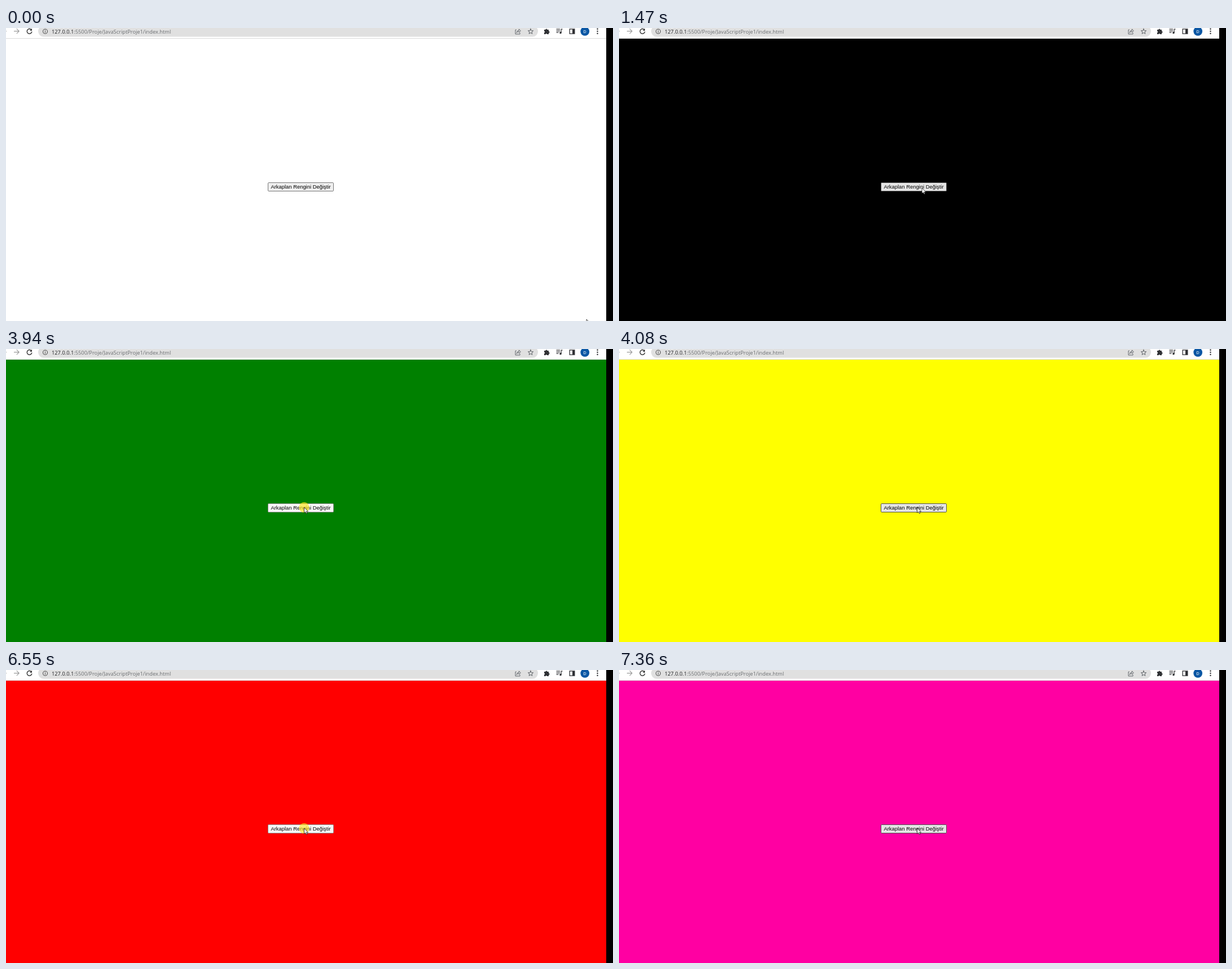
An HTML page for the animation above (8000 ms loop, 1076 by 520 pixels).

```html
<!DOCTYPE html>
<html lang="tr">
<head>
<meta charset="utf-8">
<title>Arkaplan Rengi</title>
<style>
  html, body { margin: 0; width: 100%; height: 100%; overflow: hidden; background: #000; }
  svg { display: block; width: 1076px; height: 520px; }
  .line { fill: none; stroke-linecap: round; stroke-linejoin: round; }
</style>
</head>
<body>
<svg viewBox="0 0 1076 520" xmlns="http://www.w3.org/2000/svg">
  <rect width="1076" height="520" fill="#000"/>
  <rect id="page" y="19" width="1064" height="501"/>

  <!-- toolbar -->
  <rect width="1064" height="19" fill="#fff"/>
  <rect y="18" width="1064" height="1" fill="#dadada"/>
  <rect x="57" y="-4" width="886" height="19.5" rx="9.75" fill="#e0e0e0"/>
  <path class="line" d="M-1 5.7H.4" stroke="#777"/>
  <path class="line" d="M14.5 5.7H23M19.2 1.7L23.2 5.7L19.2 9.7" stroke="#999" stroke-width="1.2"/>
  <path class="line" d="M45 3.2A4.3 4.3 0 1 0 45.7 7" stroke="#333" stroke-width="1.4"/>
  <path d="M46 .8V4.8H42Z" fill="#333"/>
  <circle cx="69.5" cy="6" r="4" fill="none" stroke="#555" stroke-width="1.1"/>
  <path d="M69.5 5.5V8.3M69.5 3.6V4.7" stroke="#555" stroke-width="1.1"/>
  <text x="81" y="9.5" font-family="'Open Sans', 'Noto Sans', sans-serif" font-size="9.29" fill="#202124">127.0.0.1<tspan fill="#6a6d70">:5500/Proje/JavaScriptProje1/index.html</tspan></text>
  <g class="line" stroke="#5f6368" stroke-width="1">
    <path d="M904.5 3.2H903V10.8H911V8.8M905.3 8C905.8 5.2 907.5 4.2 909.3 4.1V2L912.4 5L909.3 8V6C907.8 6 906.5 6.6 905.3 8Z"/>
    <path id="star"/>
  </g>
  <g fill="#303134">
    <path d="M954 3H956.3A1.6 1.6 0 1 1 959.5 3H962V5.6A1.6 1.6 0 1 1 962 8.8V11H959.3A1.5 1.5 0 0 0 956.4 11H954V8.3A1.5 1.5 0 0 0 954 5.4Z"/>
    <path d="M975.5 1.5H982V2.8H975.5ZM975.5 4.4H982V5.7H975.5ZM975.5 7.3H979.5V8.6H975.5ZM983.5 1.5H986.5V2.8H984.7V8.3H983.5Z"/>
    <circle cx="983" cy="8.4" r="1.8"/>
    <path d="M998.5 1.2H1008.5V10.8H998.5ZM999.8 2.5V9.5H1004V2.5Z" fill-rule="evenodd"/>
    <circle cx="1048.5" cy="1.7" r="1.2"/>
    <circle cx="1048.5" cy="5.7" r="1.2"/>
    <circle cx="1048.5" cy="9.7" r="1.2"/>
  </g>
  <circle cx="1026.2" cy="5.8" r="7.9" fill="#0b57a4"/>
  <text x="1026.2" y="8.6" text-anchor="middle" font-family="Roboto, sans-serif" font-size="8" fill="#fff">D</text>

  <!-- page content -->
  <rect id="button" x="464.5" y="274.5" width="116" height="15" rx="1.3"/>
  <text x="469.4" y="285" font-family="'Liberation Sans', Arial, sans-serif" font-size="9.42" fill="#000">Arkaplan Rengini Değiştir</text>
  <g id="pointer">
    <circle id="glow" r="9.2" fill="#ffe81a"/>
    <path d="M0 0V9.8L2.3 7.8L3.8 11.1L5.4 10.4L3.9 7.2H7Z" fill="#fff" stroke="#000" stroke-width=".7"/>
  </g>
</svg>
<script>
  const LOOP = 8000, TICK = 67, MOVE_TICKS = 11;
  const $ = id => document.getElementById(id);
  const page = $('page'), button = $('button'), pointer = $('pointer'), glow = $('glow');

  // [time, value] pairs; each value holds until the next one
  const colours = [[0, '#ffffff'], [870, '#000000'], [3070, '#008000'], [4080, '#ffff00'],
    [5480, '#ff0000'], [6690, '#0000ff'], [7360, '#ff00a2']];
  const glows = [[0, 0], [800, .65], [870, 0], [3010, .65], [3070, 0], [3810, .4], [3940, .65],
    [4080, 0], [5350, .35], [5480, 0], [6550, .6], [6620, .65], [6690, 0], [7290, .6], [7360, 0]];
  const rests = [[0, [536, 283]], [1330, [537, 283]], [1400, [537, 283.5]], [1470, [537, 284]],
    [3610, [528.5, 281]]];
  const looks = {
    idle: ['#efefef', '#767676'],
    hover: ['#e5e5e5', '#4f4f4f'],
    active: ['#f7f7f7', '#8d8d8d']
  };

  const at = (list, t) => list.filter(([start]) => start <= t).pop()[1];

  function position(t) {
    const end = at(rests, t);
    const p = Math.min(1, Math.floor(t / TICK) / MOVE_TICKS);
    const left = (1 - p) ** 2;
    return [end[0] + (1029 - end[0]) * left, end[1] + (517 - end[1]) * left];
  }

  function draw(t) {
    const [x, y] = position(t);
    const light = at(glows, t);
    const over = x > 464 && x < 581 && y > 274 && y < 290;
    const [fill, stroke] = looks[light ? 'active' : over ? 'hover' : 'idle'];
    page.setAttribute('fill', at(colours, t));
    button.setAttribute('fill', fill);
    button.setAttribute('stroke', stroke);
    glow.setAttribute('opacity', light);
    pointer.setAttribute('transform', `translate(${x} ${y})`);
  }

  const points = Array.from({ length: 10 }, (_, i) => {
    const r = i % 2 ? 2.1 : 4.9, a = Math.PI * (i / 5 - .5);
    return `${930 + r * Math.cos(a)} ${6.3 + r * Math.sin(a)}`;
  });
  $('star').setAttribute('d', `M${points.join('L')}Z`);

  const begin = performance.now();
  function frame() {
    draw((performance.now() - begin) % LOOP);
    requestAnimationFrame(frame);
  }
  frame();
</script>
</body>
</html>
```
